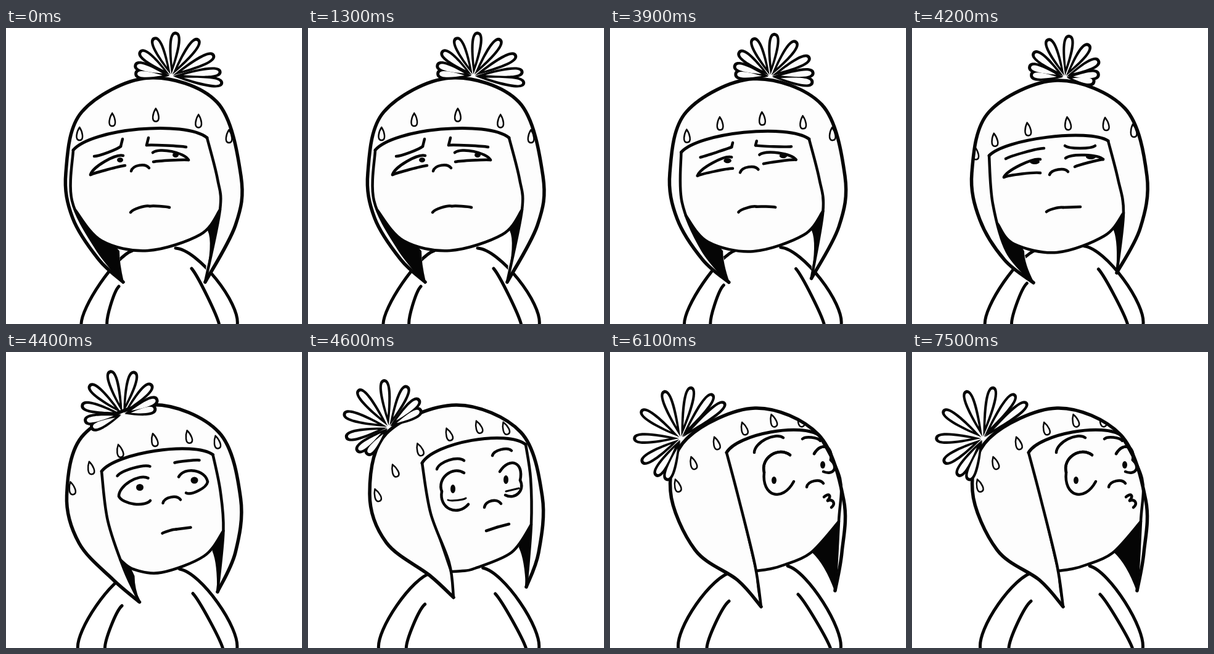
Recreate the animation shown at these times as an HTML page with a canvas. Size 480 px wide and 480 px high, loop 8000 ms.

```html
<!DOCTYPE html>
<html>
<head>
<meta charset="utf-8">
<style>
html, body { margin: 0; width: 100%; height: 100%; overflow: hidden; background: #fff; }
canvas { display: block; }
</style>
</head>
<body>
<canvas id="stage" width="480" height="480"></canvas>
<script>
const ctx = document.getElementById('stage').getContext('2d');
const INK = '#050505', PAPER = '#fdfdfd', DEG = Math.PI / 180;

// Every part has four poses: glum, looking up, startled, whistling.
const parts = {
  // Points of a smooth curve
  dome: [
    [190,412, 150,375, 108,308, 97,235, 123,136, 230,81, 342,120, 381,240, 372,320, 323,412],
    [197,413, 150,376, 110,311, 97,235, 125,136, 235,85, 345,130, 381,240, 370,325, 332,397],
    [236,398, 197,362, 127,309, 100,230, 127,132, 240,86, 345,130, 380,235, 374,325, 354,381],
    [245,413, 207,370, 138,321, 98,225, 125,140, 235,91, 338,134, 379,240, 376,325, 365,387]],
  chin: [
    [315,335, 230,361, 155,345, 112,295], [312,337, 235,364, 165,350, 139,318],
    [330,325, 270,351, 250,355, 232,356], [325,326, 280,346, 258,352, 237,355]],
  edgeL: [[107,280, 147,358], [131,285, 154,363], [199,262, 229,342], [208,235, 235,345]],
  edgeR: [[343,245, 347,295], [334,245, 343,300], [361,205, 362,280], [373,205, 371,275]],
  // Inner corner of the shadow under each flap: left, right
  shade: [[183,362, 328,328], [181,362, 328,328], [234,365, 343,317], [238,362, 328,324]],

  // Arcs: two ends and the bulge between them
  rim: [[109,198, 326,178, 24], [125,207, 318,183, 18], [185,180, 353,150, 22], [189,163, 340,136, 20]],
  browL: [[143,208, 186,192, -2], [152,212, 214,195, 2], [209,190, 253,176, 8], [234,163, 281,139, 11]],
  browR: [[228,190, 292,193, 1], [248,191, 297,191, -4], [299,168, 330,160, 6], [312,141, 341,144, 4]],
  upperL: [[137,238, 190,207, 7], [149,242, 208,213, 6], [217,226, 253,196, 16], [250,195, 292,167, 17]],
  lowerL: [[137,238, 193,223, 1], [149,242, 208,235, 2], [217,226, 260,247, -20], [250,195, 298,210, -29]],
  upperR: [[238,202, 296,214, 8], [249,211, 310,213, 6], [311,194, 344,208, 22], [331,165, 358,175, 17]],
  lowerR: [[239,217, 296,214, 1], [264,225, 310,213, 1], [320,232, 344,208, -13], [346,194, 358,175, -13]],
  nose: [[203,232, 232,227, 7], [223,238, 253,233, 6], [286,252, 313,246, 8], [319,219, 346,213, 7]],
  lipL: [[202,299, 233,289, 3], [218,298, 245,291, 2], [289,290, 307,284, 0], [347,235, 353,241, 8]],
  lipR: [[233,289, 265,291, 1], [245,291, 273,290, 0], [307,284, 326,279, 0], [353,241, 359,252, 7]],

  // Two centres, shared radii
  pupils: [[185,214, 275,206, 5,4], [199,217, 290,209, 8,4], [235,222, 321,207, 4,7], [266,208, 345,183, 4,6]],
  // Root, first and last angle, first and last length, extra length in the middle
  tuft: [[268,78, -86,98, 57,82, 0], [248,80, -86,98, 54,47, 16], [131,122, -141,62, 55,58, 20], [115,140, -161,51, 70,90, -3]],
  // First angle, step, height of the ring, its radius and slant
  drops: [[-88,30, 206,65, 0], [-75,27, 201,45, -14], [-64,20, 238,108, -46], [-67,19.5, 220,103, -40]]
};

// The shoulders drift slowly from the first pose to the last.
const body = [
  [[205,361, 122,482, -13], [198,357, 111,482, -18]],
  [[275,357, 375,482, 20], [288,347, 374,482, 17]],
  [[183,419, 164,482, -4], [193,404, 157,482, -5]],
  [[301,390, 346,482, 3], [305,393, 358,482, 3]]
];

const mix = (a, b, k) => a.map((v, i) => v + (b[i] - v) * k);
const points = list => list.flatMap((v, i) => i % 2 ? [] : [[v, list[i + 1]]]);

// Smooth curve through every point
function trace(pts, path = new Path2D(), join = false) {
  path[join ? 'lineTo' : 'moveTo'](...pts[0]);
  for (let i = 0; i < pts.length - 1; i++) {
    const p = pts[i], q = pts[i + 1], before = pts[i - 1] || p, after = pts[i + 2] || q;
    path.bezierCurveTo(
      p[0] + (q[0] - before[0]) / 6, p[1] + (q[1] - before[1]) / 6,
      q[0] - (after[0] - p[0]) / 6, q[1] - (after[1] - p[1]) / 6, ...q);
  }
  return path;
}

function bow([x1, y1, x2, y2, bulge]) {
  const dx = x2 - x1, dy = y2 - y1, k = bulge * 4 / 3 / (Math.hypot(dx, dy) || 1);
  const path = new Path2D();
  path.moveTo(x1, y1);
  path.bezierCurveTo(
    x1 + dx * .15 + dy * k, y1 + dy * .15 - dx * k,
    x2 - dx * .15 + dy * k, y2 - dy * .15 - dx * k, x2, y2);
  return path;
}

function ink(path, width = 4.5) {
  ctx.lineWidth = width;
  ctx.stroke(path);
}

function fill(path, color) {
  ctx.fillStyle = color;
  ctx.fill(path);
}

// Black area between the lower edge of a flap and an inner corner
function shade(edge, corner, lean) {
  const path = trace(edge.slice(1));
  const x = corner[0] + (edge[2][0] - corner[0]) * lean;
  path.quadraticCurveTo(x, corner[1] + 20, ...corner);
  path.closePath();
  fill(path, INK);
  ink(path, 2);
}

function leaf(x, y, angle, from, to, half, color) {
  const len = to - from;
  ctx.save();
  ctx.translate(x, y);
  ctx.rotate(angle);
  ctx.translate(0, -from);
  const path = new Path2D();
  path.moveTo(0, 0);
  path.bezierCurveTo(half, -len / 2, half * 1.6, -len, 0, -len);
  path.bezierCurveTo(-half * 1.6, -len, -half, -len / 2, 0, 0);
  fill(path, color);
  ctx.restore();
}

function drawTuft([x, y, first, last, len0, len1, extra]) {
  const leaves = [...Array(9).keys()].map(i => {
    const f = i / 8, swing = Math.sin((f * 2 - 1) * 1.3) / Math.sin(1.3);
    return {
      angle: (first + (last - first) * (swing + 1) / 2) * DEG,
      len: len0 + (len1 - len0) * f + extra * Math.sin(Math.PI * f)
    };
  });
  for (const { angle, len } of leaves) leaf(x, y, angle, 3, len + 3, 9, INK);
  for (const { angle, len } of leaves) leaf(x, y, angle, len * .25, len - 2, 4.8, PAPER);
}

function drawDrops([first, step, level, radius, slant]) {
  const h = 21;
  for (let i = 0; i < 6; i++) {
    const a = first + i * step, sin = Math.sin(a * DEG), cos = Math.cos(a * DEG);
    if (Math.abs(a) > 80) continue;
    ctx.save();
    ctx.translate(238 + 140 * sin, level - radius * cos + slant * sin);
    ctx.rotate(slant * .45 * DEG);
    const path = new Path2D();
    path.moveTo(0, -h / 2);
    path.bezierCurveTo(h * .2, -h * .2, h * .4, h / 2, 0, h / 2);
    path.bezierCurveTo(-h * .4, h / 2, -h * .2, -h * .2, 0, -h / 2);
    ink(path, 2.5);
    ctx.restore();
  }
}

function poseAt(t) {
  if (t < 3800) return 0;
  if (t < 4200) return (t - 3700) / 500;
  if (t < 4600) return 1 + (t - 4200) / 400;
  return Math.min(3, 2 + (t - 4600) / 200);
}

// 0 is open, 1 is shut
function blinkAt(t) {
  for (const start of [1000, 2400, 5800, 7200])
    if (t >= start && t < start + 300) return t == start + 100 ? 1 : .5;
  return 0;
}

function drawEyes(s, pose, blink) {
  for (const [upper, lower] of [[s.upperL, s.lowerL], [s.upperR, s.lowerR]]) {
    ink(bow(mix(upper, lower, blink)));
    ink(bow(lower));
    if (pose > 2) ink(bow(upper));
  }
  const [x1, y1, x2, y2, rx, ry] = s.pupils;
  if (pose > 1.7 && pose < 2.6) {
    ink(bow([x1 - 8, y1 + 18, x1 + 21, y1 + 15, -2]), 3);
    ink(bow([x2, y2 + 19, x2 + 21, y2 + 14, 0]), 3);
  }
  if (blink == 1) return;
  for (const [x, y] of [[x1, y1], [x2, y2]]) {
    const path = new Path2D();
    path.ellipse(x, y, rx, ry, 0, 0, 7);
    fill(path, INK);
  }
}

function drawHead(s) {
  const dome = points(s.dome), chin = points(s.chin), [left, right] = points(s.shade);
  const edgeL = [s.rim.slice(0, 2), ...points(s.edgeL), dome[0]];
  const edgeR = [s.rim.slice(2, 4), ...points(s.edgeR), dome[dome.length - 1]];
  const jaw = [edgeR[2], ...chin];

  const head = trace(dome);
  head.lineTo(...right);
  trace(chin, head, true);
  head.lineTo(...left);
  fill(head, PAPER);

  ctx.save();
  ctx.clip(head);
  drawDrops(s.drops);
  ctx.restore();

  shade(edgeL, left, 0);
  shade(edgeR, right, .5);
  const face = bow(s.rim);
  trace(edgeR.slice(0, 3), face, true);
  trace(jaw, face, true);
  face.lineTo(...edgeL[1]);
  fill(face, PAPER);

  [jaw, edgeL, edgeR].forEach(p => ink(trace(p)));
  ink(bow(s.rim), 5);
  ink(trace(dome), 5.5);
}

function draw(t) {
  const pose = poseAt(t), from = Math.min(2, Math.floor(pose)), s = {};
  for (const name in parts)
    s[name] = mix(parts[name][from], parts[name][from + 1], pose - from);

  ctx.fillStyle = '#fff';
  ctx.fillRect(0, 0, 480, 480);
  ctx.strokeStyle = INK;
  ctx.lineCap = ctx.lineJoin = 'round';

  for (const [start, end] of body) ink(bow(mix(start, end, pose / 3)), 5);
  drawHead(s);
  drawTuft(s.tuft);

  for (const name of ['browL', 'browR', 'nose', 'lipL', 'lipR']) ink(bow(s[name]));
  if (pose < 1) {
    const frown = 1 - pose;
    for (const [x, y] of [s.browL.slice(2, 4), s.browR.slice(0, 2)])
      ink(bow([x, y, x + 3 * frown, y - 12 * frown, 0]));
  }
  drawEyes(s, pose, blinkAt(t));
}

function tick() {
  draw(Math.floor(performance.now() % 8000 / 100) * 100);
  requestAnimationFrame(tick);
}
tick();
</script>
</body>
</html>
```
